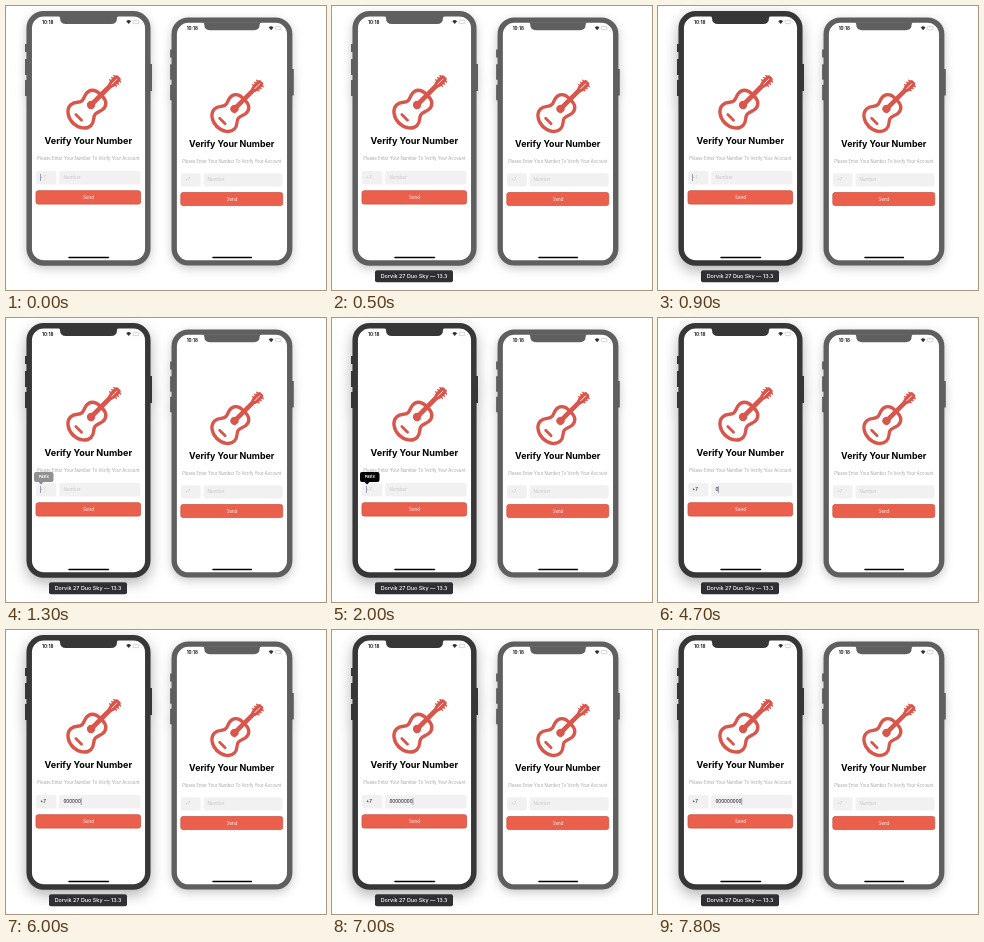
Write an HTML page that moves like this. It is 320 px wide and 284 px high and loops after 8 s.

```html
<!DOCTYPE html>
<html lang="en">
<head>
<meta charset="utf-8">
<title>Verify Your Number</title>
<style>
  html, body { margin: 0; width: 100%; height: 100%; overflow: hidden; background: #fff; }
  svg { display: block; width: 100%; height: 100%; font-family: Inter, "Open Sans", sans-serif; }
  .idle { color: #5f5f5f; filter: drop-shadow(0 3px 5px rgb(0 0 0 / .22)); }
  .active { color: #373737; filter: drop-shadow(0 5px 7px rgb(0 0 0 / .3)); }
  .entry { font-size: 4.6px; }
  .hint { fill: #c6c6c6; }
  .mid { text-anchor: middle; }
</style>
</head>
<body>
<svg viewBox="0 0 320 284">
  <defs>
    <!-- Drawn along the x axis, head to the right -->
    <g id="guitar" transform="translate(84 100) rotate(-45)" fill="none" stroke="#d8564c" stroke-linecap="round" stroke-linejoin="round">
      <path id="side" stroke-width="3.4" d="M15.5 -2.5C15.5 -9 11 -12 6.5 -11.5C2 -11 1 -9 -2.5 -9.5C-6 -10 -7.5 -14.5 -13 -14.5C-19 -14.5 -24 -8 -24 0"/>
      <use href="#side" transform="scale(1 -1)"/>
      <path stroke-width="4.8" d="M2 0H30"/>
      <circle cx="1.5" r="4.2" fill="#d8564c" stroke="none"/>
      <path stroke-width="2.8" d="M-16 -4V4"/>
      <path stroke-width="1.4" fill="#d8564c" d="M29 -2L32 -3H39L40.5 -2V2L39 3H32L29 2Z"/>
      <path stroke-width="1.4" d="M32.5 -4.7V4.7M35.5 -4.7V4.7M38.5 -4.7V4.7"/>
      <path stroke="#fff" stroke-width=".9" d="M31 0H38"/>
    </g>

    <g id="phone">
      <path stroke="currentColor" stroke-width="2" d="M20 38V46M20 53V69M20 74V90M145 58V85"/>
      <rect x="23.2" y="7.7" width="118.6" height="249.3" rx="14.5" fill="#fff" stroke="currentColor" stroke-width="5.5"/>
      <path fill="currentColor" d="M52 10Q54 10 54 12Q54 18 60 18H105Q111 18 111 12Q111 10 113 10Z"/>
    </g>

    <g id="screen">
      <text x="36" y="17.9" font-size="4.7" font-weight="600">10:18</text>
      <path d="M120.300 15.2Q122.7 13 125.1 15.2L122.7 18Z" fill="#333"/>
      <rect x="127.2" y="14.2" width="5.6" height="3.4" rx="1" fill="#fff" stroke="#aaa" stroke-width=".5"/>
      <use href="#guitar"/>
      <text class="mid" x="82.3" y="138.2" font-size="9.1" font-weight="700">Verify Your Number</text>
      <text class="mid" x="82.3" y="154" font-size="4.33" fill="#a5a5a5">Please Enter Your Number To Verify Your Account</text>
      <rect x="30" y="165" width="20.5" height="13.5" rx="2.5" fill="#f1f1f1"/>
      <rect x="53.2" y="165" width="81.3" height="13.5" rx="2.5" fill="#f1f1f1"/>
      <rect x="30" y="184.7" width="104.6" height="13.4" rx="2.2" fill="#ea604c" stroke="#cf5544" stroke-width=".8"/>
      <text class="mid" x="82.5" y="193.1" font-size="4.5" fill="#fff">Send</text>
      <path d="M63 251.5H102.5" stroke="#000" stroke-width="1.5" stroke-linecap="round"/>
    </g>
  </defs>

  <rect width="320" height="284" fill="#fff"/>

  <g transform="translate(145.600 6.600) scale(.974)">
    <use href="#phone" class="idle"/>
    <use href="#screen"/>
    <g class="entry hint">
      <text x="34.3" y="173.3">+7</text>
      <text x="57.4" y="173.3">Number</text>
    </g>
  </g>

  <use id="leftPhone" href="#phone"/>
  <use href="#screen"/>
  <g class="entry">
    <text id="code" x="34.3" y="173.3"></text>
    <text id="number" x="57.4" y="173.3"></text>
  </g>
  <rect id="caret" y="168" width=".7" height="7" fill="#737a9c"/>
  <g id="paste">
    <path d="M30 154H45.5Q47.5 154 47.5 156V162Q47.5 164 45.5 164H37.5L35 166.5L32.500 164H30Q28 164 28 162V156Q28 154 30 154Z"/>
    <text class="mid" x="37.8" y="160.4" font-size="3.8" font-weight="600" fill="#fff">Paste</text>
  </g>
  <g id="device">
    <rect x="43" y="264.3" width="78" height="12" rx="2" fill="#303032"/>
    <text class="mid" x="82" y="272.300" font-size="5.45" font-weight="500" fill="#fff">Dorvik 27 Duo Sky — 13.3</text>
  </g>
</svg>
<script>
  const LOOP = 8000;
  const digitTimes = [4700, 4900, 5000, 5600, 5800, 6000, 6700, 7000, 7600];
  const caretHidden = [[100, 900], [1600, 2000], [4000, 4400]];
  const [leftPhone, code, number, caret, paste, device] =
    ["leftPhone", "code", "number", "caret", "paste", "device"].map(id => document.getElementById(id));

  const ramp = (t, from, to) => Math.min(1, Math.max(0, (t - from) / (to - from)));

  function setField(field, value, hint) {
    const text = value || hint;
    if (field.textContent !== text) field.textContent = text;
    field.classList.toggle("hint", !value);
  }

  function caretAfter(field, value) {
    return +field.getAttribute("x") + (value ? field.getComputedTextLength() : 0);
  }

  function draw(t) {
    const codeValue = "+7".slice(0, (t >= 2400) + (t >= 2800));
    const digits = "0".repeat(digitTimes.filter(time => t >= time).length);
    setField(code, codeValue, "+7");
    setField(number, digits, "Number");

    const caretX = t < 3300 ? caretAfter(code, codeValue) : caretAfter(number, digits);
    caret.setAttribute("x", caretX);
    caret.style.opacity = caretHidden.reduce(
      (alpha, [off, on]) => alpha * (1 - ramp(t, off, off + 200) + ramp(t, on - 100, on)), 1);

    leftPhone.setAttribute("class", t < 900 ? "idle" : "active");
    device.style.opacity = ramp(t, 50, 450);
    paste.style.opacity = ramp(t, 1150, 1500) * (1 - ramp(t, 2350, 2500));
  }

  function tick(now) {
    draw(now % LOOP);
    requestAnimationFrame(tick);
  }
  draw(0);
  requestAnimationFrame(tick);
</script>
</body>
</html>
```
